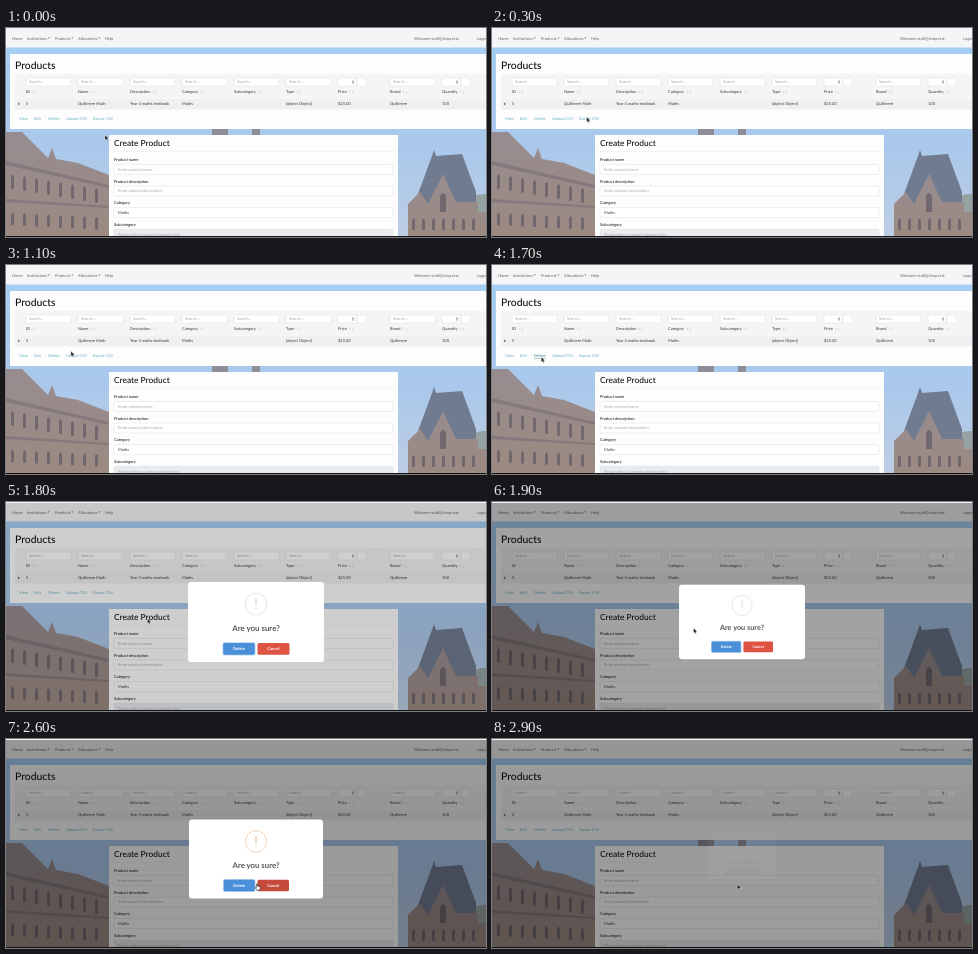
Recreate the animation shown at these times as an HTML page. Size 480 by 209 pixels, loop 3.1 s.

```html
<!DOCTYPE html>
<html lang="en">
<head>
<meta charset="utf-8">
<title>Delete a product</title>
<style>
  html, body { margin: 0; width: 100%; height: 100%; overflow: hidden; }
  svg { display: block; width: 100vw; height: 100vh; }
  text { font: 4px Lato, sans-serif; fill: #3a3a3a; text-rendering: geometricPrecision; }
  .title { font-weight: 500; fill: #111; }
  .label { fill: #111; }
  .nav { fill: #686868; }
  .hint { fill: #a8a8a8; }
  .sort { font-size: 3px; fill: #b5b5b5; }
  .link { fill: #69b0c2; }
  .box { fill: #fff; stroke: #e0e2e5; stroke-width: .6; }
  .off { fill: #e9ecef; }
  .button { font-weight: bold; fill: #fff; text-anchor: middle; }
</style>
</head>
<body>
<svg viewBox="0 0 480 209" preserveAspectRatio="none">
  <defs>
    <linearGradient id="sky" x2="0" y2="1">
      <stop stop-color="#a5d0f5"/>
      <stop offset=".55" stop-color="#a9c8ec"/>
      <stop offset="1" stop-color="#bccde3"/>
    </linearGradient>
    <linearGradient id="brick" x2="0" y2="1">
      <stop stop-color="#978c90"/>
      <stop offset="1" stop-color="#9c8a81"/>
    </linearGradient>
  </defs>
  <g id="photo">
    <rect width="480" height="209" fill="url(#sky)"/>
    <path fill="#8d8d98" d="M206 101H222V107H206ZM246 101H254V107H246Z"/>
    <path fill="#96a3a3" d="M462 172Q470 165 480 166V209H462Z"/>
    <path fill="url(#brick)" d="M0 209V104H16L42 130L46 120L50 131L72 135L103 147V209Z"/>
    <path fill="#84797c" d="M0 133L103 157V160L0 137ZM0 171L103 178V180L0 174Z"/>
    <path fill="#707b8f" d="M412 166L426 128L428 122L430 128L456 126L470 164V176H412Z"/>
    <path fill="url(#brick)" d="M402 209V176L414 164L422 176L437 146L450 174H472V184H480V209Z"/>
  </g>
  <g id="page"></g>
  <rect id="shade" y="1" width="480" height="207"/>
  <g id="modal">
    <rect x="-67" y="-39.5" width="134" height="79" rx="3" fill="#fff"/>
    <g id="icon" stroke="#e5e1dd" fill="none">
      <circle cy="-17.5" r="10.7" stroke-width=".9"/>
      <path d="M0 -23.5V-16M0 -13.3V-12" stroke-width="1.4"/>
    </g>
    <text y="9" text-anchor="middle" style="font-size:7.8px;font-weight:bold;fill:#595959">Are you sure?</text>
    <rect x="-33" y="20" width="32.5" height="13" rx="2" fill="#b9d5f1"/>
    <rect x="-32.3" y="20.7" width="31" height="11.6" rx="1.5" fill="#4a90d9"/>
    <rect id="cancel" x="1.5" y="20.7" width="31.5" height="11.6" rx="1.5"/>
    <text class="button" x="-16.8" y="28">Delete</text>
    <text class="button" x="17.2" y="28">Cancel</text>
  </g>
  <g id="pointer" stroke="#fff" stroke-width=".4">
    <path id="arrow" fill="#111" d="M0 0V5.2L1.2 4.1L2.1 6L3 5.6L2.1 3.8H3.7Z"/>
    <path id="hand" fill="#fff" stroke="#111" stroke-width=".6" d="M-.6 0Q0 -.8 .6 0V2L3 2.6Q3.6 3 3.2 5L2.6 6.2H0L-2 3.5Q-1.6 2.8 -.6 3.6Z"/>
  </g>
  <rect y="208" width="480" height="1" fill="#111"/>
</svg>
<script>
const $ = id => document.getElementById(id);
const rect = (x, y, w, h, attrs) => `<rect x="${x}" y="${y}" width="${w}" height="${h}" ${attrs}/>`;
const fill = color => `fill="${color}"`;
const text = (x, y, s, cls = "", attrs = "") => `<text x="${x}" y="${y}" class="${cls}" ${attrs}>${s}</text>`;
const box = (x, y, w, h, cls = "") => rect(x, y, w, h, `rx="1.2" class="box ${cls}"`);
const caret = x => `<path d="M${x} 9.4h2.2l-1.1 1.3Z" fill="#686868"/>`;

// Gothic windows on the two facades
const windowAt = (x, y, w, h) =>
  `<path d="M${x} ${y + h}v${-h}q${w / 2} ${-w} ${w} 0v${h}Z" fill="#70686e"/>`;
let facade = windowAt(434, 168, 6, 16);
for (let x = 5; x < 100; x += 12)
  facade += windowAt(x, 147 + x / 6, 3, 13) + windowAt(x, 186 + x / 20, 3, 11);
for (let x = 406; x < 475; x += 10) facade += windowAt(x, 192, 3, 10);
$("photo").innerHTML += facade;

function navBar() {
  return rect(0, 0, 480, 19.5, fill("#f4f5f6")) +
    [[6, "Home"], [21, "Institutions"], [49, "Products"], [72, "Allocations"], [99, "Help"],
     [408, "Welcome staff@shop.test"], [471, "Logout"]].map(([x, s]) => text(x, 11.7, s, "nav")).join("") +
    [41.7, 65.3, 92.3].map(caret).join("");
}

function productTable() {
  const columns = [["ID", "5"], ["Name", "Quillmere Math"], ["Description", "Year 4 maths textbook"],
    ["Category", "Maths"], ["Subcategory", ""], ["Type", "[object Object]"],
    ["Price", "$25.00"], ["Brand", "Quillmere"], ["Quantity", "100"]];
  let out = rect(4, 26, 476, 75, fill("#fdfdfd")) +
    text(9, 41, "Products", "title", 'style="font-size:10.4px"') +
    rect(9, 46, 471, 24, fill("#f5f5f6")) + rect(9, 70.5, 471, 11, fill("#eff0f1")) +
    '<path d="M12 74.5l2 1.4l-2 1.4Z" fill="#666"/>';
  columns.forEach(([head, cell], i) => {
    const x = 20 + 52 * i;
    if (head == "Price" || head == "Quantity") {
      out += box(x, 50, 18, 8) + box(x + 19, 50, 9, 8) +
        `<path d="M${x + 14} 53.6l1-1.4l1 1.4ZM${x + 14} 54.4l1 1.4l1-1.4Z" fill="#555"/>`;
    } else out += box(x, 50, 45, 8) + text(x + 3, 55.4, "Search...", "hint");
    out += text(x, 64.8, `${head} <tspan class="sort" dx="1">↑ ↓</tspan>`) + text(x, 77.2, cell);
  });
  return out +
    [[13, "View"], [28, "Edit"], [42, "Delete", 'id="deleteLink"'], [60, "Upload CSV"], [87, "Export CSV"]]
      .map(([x, s, id]) => text(x, 92.4, s, "link", id)).join("");
}

function createForm() {
  const fields = [["Product name", "Enter product name"], ["Product description", "Enter product description"],
    ["Category", "Maths"], ["Subcategory", "Please select a parent category first"]];
  return rect(103, 107, 289, 102, fill("#fdfdfd")) + rect(103, 123.5, 289, .5, fill("#ececec")) +
    text(108, 118.2, "Create Product", "title", 'style="font-size:8.4px"') +
    fields.map(([label, value], i) => {
      const y = 133 + 21.6 * i;
      return text(108, y, label, "label") + box(108, y + 3.4, 279, 10, i == 3 ? "off" : "") +
        text(112, y + 9.8, value, i == 2 ? "" : "hint");
    }).join("");
}

$("page").innerHTML = navBar() + productTable() + createForm() + rect(0, 0, 480, 1, fill("#f4f5f6"));

// Each track holds [time, ...values]
const path = [[0, 99, 107], [500, 91.7, 77], [800, 91, 78], [1300, 47.5, 91.5], [1700, 49.3, 92],
  [1800, 141.5, 116.5], [1900, 201.5, 126], [2400, 250, 145], [2600, 251, 145], [2900, 245.3, 145.3]];
const zoom = [[1700, .7], [1800, 1.015], [1900, .94], [2000, 1], [2750, 1], [2900, .5]];
const dim = [[1700, 0], [1800, .19], [1900, .36], [2000, .39]];
const fade = [[1700, 0], [1800, 1], [2750, 1], [2900, .04]];

function sample(track, t) {
  const i = track.findIndex(key => key[0] > t);
  if (i < 1) return track[i ? track.length - 1 : 0].slice(1);
  const [a, b] = [track[i - 1], track[i]];
  const k = (t - a[0]) / (b[0] - a[0]);
  return a.slice(1).map((v, j) => v + (b[j + 1] - v) * k);
}

function draw(now) {
  const t = Math.min(2900, Math.floor(now % 3100 / 100) * 100);
  const [x, y] = sample(path, t);
  const overLink = t >= 1300 && t < 1800;
  const overButton = t >= 2400 && t < 2800;
  $("pointer").setAttribute("transform", `translate(${x} ${y})`);
  $("arrow").style.display = overButton ? "none" : "";
  $("hand").style.display = overButton ? "" : "none";
  $("deleteLink").style.cssText = overLink ? "fill:#417f8e;text-decoration:underline .3px" : "";
  $("shade").style.opacity = sample(dim, t);
  $("modal").style.opacity = sample(fade, t);
  $("modal").setAttribute("transform", `translate(250 120) scale(${sample(zoom, t)})`);
  $("icon").setAttribute("stroke", t < 2000 ? "#e5e1dd" : "#f0cfb0");
  $("cancel").setAttribute("fill", overButton ? "#c64a3c" : "#df5342");
  requestAnimationFrame(draw);
}
requestAnimationFrame(draw);
</script>
</body>
</html>
```
